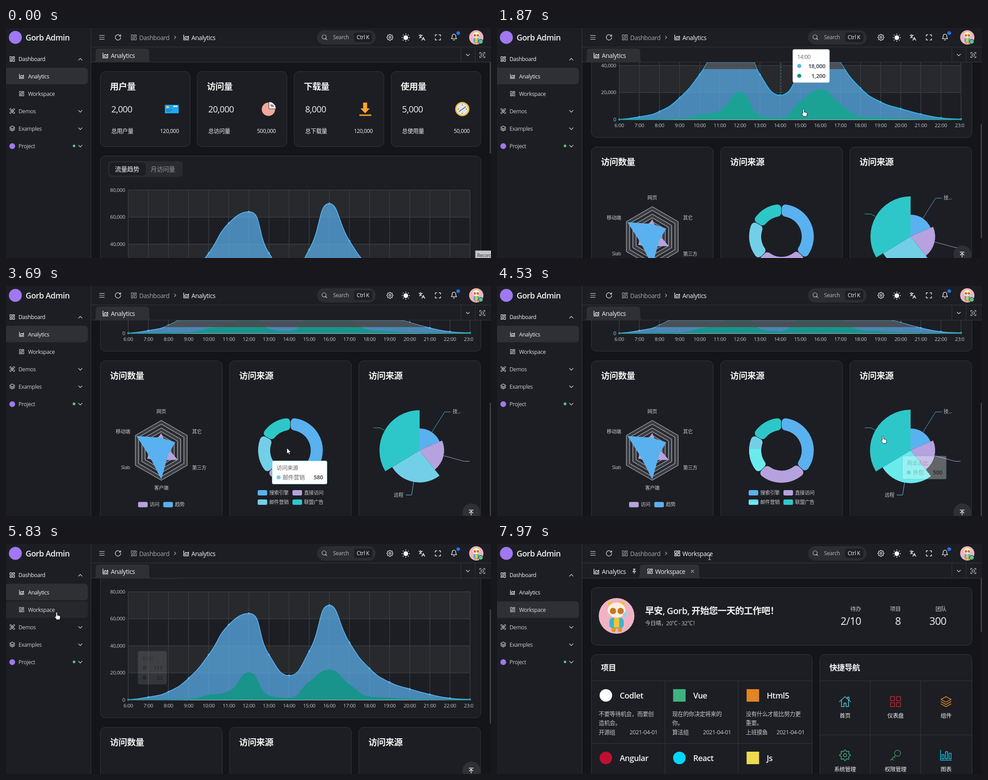
An HTML page that plays this animation: 1087 by 515 pixels, repeating every 8 s.

```html
<!DOCTYPE html>
<html lang="zh-CN">
<head>
<meta charset="utf-8">
<title>Admin dashboard</title>
<style>
html, body { margin: 0; height: 100%; overflow: hidden; background: #141519; }
svg { display: block; width: 1087px; height: 515px; }
text { font-family: "Open Sans", "Noto Sans CJK SC", "Noto Sans CJK", sans-serif; letter-spacing: -.03em; white-space: pre; }
</style>
</head>
<body>
<svg id="stage" viewBox="0 0 1087 515"></svg>
<script>
const BG = '#1c1e23', LINE = '#36373b', SOFT = '#2e3033', WHITE = '#f2f2f2', GREY = '#a3a5a9', PALE = '#c9cacd';
const BLUE = '#5ab1ef', LILAC = '#b6a2de', SKY = '#73cfe8', TEAL = '#2ec7c9';

// drawing helpers
const T = (x, y, s, size = 12.3, fill = WHITE, anchor = 'start', weight = 400) =>
  `<text x="${x}" y="${y}" font-size="${size}" fill="${fill}" text-anchor="${anchor}" font-weight="${weight}">${s}</text>`;
const R = (x, y, w, h, r, fill, stroke = 'none') =>
  `<rect x="${x}" y="${y}" width="${w}" height="${h}" rx="${r}" fill="${fill}" stroke="${stroke}"/>`;
const C = (x, y, r, fill, extra = '') => `<circle cx="${x}" cy="${y}" r="${r}" fill="${fill}" ${extra}/>`;
const P = (d, fill = 'none', stroke = 'none', w = 1, extra = '') =>
  `<path d="${d}" fill="${fill}" stroke="${stroke}" stroke-width="${w}" ${extra}/>`;
const G = (id, s) => `<g id="${id}">${s}</g>`;
const card = (x, y, w, h) => R(x + .5, y + .5, w, h, 11, BG, LINE);
const polar = (cx, cy, r, a) => `${(cx + r * Math.sin(a)).toFixed(2)} ${(cy - r * Math.cos(a)).toFixed(2)}`;
const range = n => [...Array(n).keys()];

const gear = 'M' + range(32).map(i => polar(12, 12, i % 4 < 2 ? 10.5 : 8, (i - .5) * Math.PI / 16)).join('L') +
  'ZM15.2 12a3.2 3.2 0 1 1-6.4 0a3.2 3.2 0 0 1 6.4 0';
const corners = 'M3 8V3h5M16 3h5v5M21 16v5h-5M8 21H3v-5';
const icons = {
  gear,
  dash: 'M3 3h7v9H3zM14 3h7v5h-7zM14 12h7v9h-7zM3 16h7v5H3z',
  area: 'M3 3v18h18M7 17v-5l4-4 4 4 5-5v10z',
  menu: 'M2 4h20M2 12h20M2 20h20',
  reload: 'M21 12a9 9 0 1 1-3-6.7L21 8M21 3v5h-5',
  search: 'M19 11a8 8 0 1 1-16 0a8 8 0 0 1 16 0M22 22l-5.3-5.3',
  down: 'M4 8l8 8 8-8', up: 'M4 16l8-8 8 8', right: 'M8 4l8 8-8 8',
  layers: 'M12 2L2 7.5l10 5.5 10-5.5zM2 12l10 5.5L22 12M2 16.5L12 22l10-5.5',
  full: corners,
  focus: corners + 'M8 8h8v8H8z',
  cube: corners + 'M12 6l5 3v6l-5 3-5-3V9zM7 9l5 3 5-3M12 12v6',
  lang: 'M5 8l6 6M4 14l6-6 2-3M2 5h12M7 2v3M22 22l-5-10-5 10M14 18h6',
  bell: 'M6 8a6 6 0 0 1 12 0c0 7 3 9 3 9H3s3-2 3-9M10.3 21a1.9 1.9 0 0 0 3.4 0',
  pin: 'M8 3h8M10 3v7l-4 4h12l-4-4V3M12 14v8',
  close: 'M5 5l14 14M19 5L5 19',
  top: 'M4 3h16M12 22V8M5 14l7-7 7 7',
  home: 'M1 12L12 2l11 10M5 9v13h5v-7h4v7h5V9M17 6V3h3v5',
  grid: 'M2 2h8v8H2zM14 2h8v8h-8zM2 14h8v8H2zM14 14h8v8h-8z',
  key: 'M22 8a6 6 0 1 1-12 0a6 6 0 0 1 12 0M11.7 12.3L2 22M5 19l3 3M9 15l2 2',
  bars: 'M1 2v20h22M4 19V11h4v8zM11 19V5h4v14zM18 19V8h4v11z'
};
const I = (name, cx, cy, size, color = WHITE, w = 1.2) =>
  P(icons[name], 'none', color, w * 24 / size,
    `stroke-linejoin="round" stroke-linecap="round" transform="translate(${cx - size / 2} ${cy - size / 2}) scale(${size / 24})"`);

const avatar = (x, y, r) => `<g transform="translate(${x} ${y}) scale(${r / 40})">` +
  C(0, 0, 40, '#f0b3c6') + C(-13, -26, 6, '#f2c230') + C(13, -26, 6, '#f2c230') +
  `<ellipse cy="-13" rx="20" ry="17" fill="#f6efe2"/>` + C(-8, -11, 7, '#c9761e') + C(9, -11, 7, '#c9761e') +
  R(-16, 4, 32, 24, 8, '#3cb4cf') + R(-6, 4, 12, 22, 3, '#f4c534') + C(19, -3, 5, '#8fd6ea') +
  R(-11, 26, 9, 10, 3, '#d99a2b') + R(3, 26, 9, 10, 3, '#d99a2b') + '</g>';

// analytics: number cards
const badge = [
  R(356, 172, 31, 19, 1, '#1ea7ee') + R(359, 175, 6, 4, 1, '#f6d75c') + R(375, 174, 9, 3, 0, '#d8f0ff') + P('M359 183h14M359 186h10', 'none', '#0c5f96', 1.2),
  C(371, 182, 15, '#f0a899') + P('M372 181V165a16 16 0 0 1 16 16z', '#f4f4f4', '#222', 1) + T(379, 177, '%', 9, '#222', 'middle', 600),
  P('M366 167h9v13h6l-10.5 11-10.5-11h6z', '#fba62f') + R(357.5, 193.5, 27, 3.5, 1, '#e98f1c'),
  C(371, 181.5, 14.5, '#dfe6ea', 'stroke="#f3b92e" stroke-width="3"') + P('M364 187l7-5 8-6M371 171v2M371 190v2M361 181.5h2M379 181.5h2', 'none', '#333', 1.3)
];
const stats = [['用户量', '2,000', '120,000'], ['访问量', '20,000', '500,000'], ['下载量', '8,000', '120,000'], ['使用量', '5,000', '50,000']]
  .map(([name, n, sum], i) => `<g transform="translate(${i * 217.2} 0)">` + card(211, 97, 201, 168) +
    T(233, 138, name, 19.7, WHITE, 'start', 600) + T(236, 189, n, 19.7) + badge[i] +
    T(236, 235, '总' + name, 12.7) + T(387.5, 235, sum, 12.2, WHITE, 'end') + '</g>').join('');

// analytics: area chart
const X0 = 274, X1 = 1040, Y0 = 605, STEP = (X1 - X0) / 17, UNIT = 60.5;
const visits = [111, 2000, 6000, 16000, 33333, 55555, 64000, 33333, 18000, 36000, 70000, 42444, 23222, 13000, 8000, 4000, 1200, 333];
const trend = [33, 66, 88, 333, 3333, 6200, 20000, 3000, 1200, 13000, 22000, 11000, 2221, 1201, 390, 198, 60, 30];
const points = data => data.map((v, i) => [X0 + i * STEP, Y0 - v / 20000 * UNIT]);
const clamp = (v, a, b) => Math.max(Math.min(a, b), Math.min(v, Math.max(a, b)));

// smooth line whose control points never leave the span of their neighbours
function curve(p) {
  let d = 'M' + p[0], out = p[0];
  for (let i = 1; i < p.length; i++) {
    const a = p[i - 1], b = p[i], c = p[i + 1];
    let inn = b, next = b;
    if (c) {
      const l1 = Math.hypot(b[0] - a[0], b[1] - a[1]), l2 = Math.hypot(c[0] - b[0], c[1] - b[1]);
      const k = l2 / (l1 + l2);
      next = b.map((v, j) => clamp(v + (c[j] - a[j]) * .5 * k, c[j], v));
      inn = b.map((v, j) => clamp(v - (next[j] - v) * l1 / l2, a[j], v));
      next = b.map((v, j) => v + (v - inn[j]) * l2 / l1);
    }
    d += `C${out} ${inn} ${b}`;
    out = next;
  }
  return d;
}
const close = `L${X1} ${Y0}L${X0} ${Y0}Z`;
const blueLine = curve(points(visits)), greenLine = curve(points(trend));
const series = (blue, green, w) =>
  P(blueLine + close, BLUE, 'none', 0, 'opacity=".72"') + P(blueLine, 'none', blue, w) +
  points(visits).map(p => C(...p, 2.2, blue)).join('') +
  P(greenLine + close, green, 'none', 0, 'opacity=".95"') + P(greenLine, 'none', green, w) +
  points(trend).map(p => C(...p, 1.8, green)).join('');
const chart = card(211, 286, 853, 358.5) + R(229, 298, 167, 35.5, 8, '#292b2f') + R(231.5, 301, 81.5, 29.5, 6, BG) +
  T(244, 321, '流量趋势', 14.1) + T(324, 321, '月访问量', 14.1, '#929498') +
  R(X0, 363, 766, UNIT, 0, '#27292d') + R(X0, 363 + 2 * UNIT, 766, UNIT, 0, '#27292d') +
  range(5).map(i => P(`M${X0} ${363 + i * UNIT}H${X1}`, 'none', '#3a3c41', 1.5) +
    T(267, 366.5 + i * UNIT, i < 4 ? 80 - i * 20 + ',000' : '0', 11.5, '#c3c5ca', 'end')).join('') +
  range(18).map(i => P(`M${X0 + i * STEP} 363V${Y0}`, 'none', '#3a3c41', 1.5)).join('') +
  P(`M${X0} ${Y0 + .5}H${X1}`, 'none', '#b9bbc0', 1) +
  `<g clip-path="url(#plot)">` + range(18).map(i => T(X0 + i * STEP, 621.5, i + 6 + ':00', 11.5, '#c3c5ca', 'middle')).join('') +
  G('calm', series(BLUE, '#16958b', 1.8)) + G('hover', series('#37b4f2', '#1aa394', 2) +
    P(`M636.5 479V${Y0}`, 'none', '#179a8b', 1, 'stroke-dasharray="4 3"')) + '</g>' +
  `<g clip-path="url(#under)"><rect id="band" x="${X0}" width="766" height="14" fill="#4a4d51" opacity=".95"/></g>`;

// analytics: radar, ring, rose
const CY = 867, TURN = Math.PI * 2;
const hex = vals => 'M' + vals.map((v, i) => polar(348, CY, 67 * v, -i * TURN / 6)).join('L') + 'Z';
const swatch = (x, y, color, label) => R(x, y - 6, 21.5, 12, 3, color) + T(x + 26, y + 3.5, label, 11.2, PALE);
const small = (x, y, s, anchor) => T(x, y, s, 11, PALE, anchor);
const radar = range(8).map(i => P(hex(Array(6).fill(1 - i / 8)), i % 2 ? '#292b30' : '#3b3d42', '#d9dbe0', 1)).join('') +
  P(hex([.58, .32, .55, .32, .64, .22]), LILAC) + P(hex([.42, .96, .44, .97, .27, .54]), BLUE) +
  small(348, 784, '网页', 'middle') + small(417, 829, '其它') + small(417, 910, '第三方') + small(348, 955, '客户端', 'middle') +
  small(278, 909, 'Slab', 'end') + small(278, 829, '移动端', 'end') +
  swatch(296, 988.5, LILAC, '访问') + swatch(352.5, 988.5, BLUE, '趋势');

// ring sector: an inset shape with a thick round-joined outline
function ringPart(from, to, color) {
  const cx = 637.5, o = 64, n = 54, a = from * TURN, b = to * TURN;
  const inset = r => Math.asin(9 / r);
  return P(`M${polar(cx, CY, o, a + inset(o))}A${o} ${o} 0 0 1 ${polar(cx, CY, o, b - inset(o))}` +
    `L${polar(cx, CY, n, b - inset(n))}A${n} ${n} 0 0 0 ${polar(cx, CY, n, a + inset(n))}Z`, color, color, 17, 'stroke-linejoin="round"');
}
const shares = (vals, draw) => {
  const sum = vals.reduce((a, b) => a + b);
  let at = 0;
  return vals.map((v, i) => draw(at, at += v / sum, i)).join('');
};
const hues = [BLUE, LILAC, SKY, TEAL];
const sources = [1048, 735, 580, 484];
const ring = shares(sources, (a, b, i) => ringPart(a, b, hues[i])) +
  swatch(564, 962, BLUE, '搜索引擎') + swatch(642, 962, LILAC, '直接访问') +
  swatch(564, 983, SKY, '邮件营销') + swatch(642, 983, TEAL, '联盟广告') +
  G('mailHot', shares(sources, (a, b, i) => i == 2 ? ringPart(a, b, 'url(#half)') : '') + R(564, 977, 21.5, 12, 3, 'url(#half)'));

const rose = (colors, radii) => shares([274, 310, 400, 500], (a, b, i) =>
  P(`M927 ${CY}L${polar(927, CY, radii[i], a * TURN)}A${radii[i]} ${radii[i]} 0 0 1 ${polar(927, CY, radii[i], b * TURN)}Z`, colors[i]));
const pie = P('M954 827L983 781H997', 'none', BLUE) + P('M981 879L1027 891.5H1039', 'none', LILAC) +
  P('M914 936L909 967H896', 'none', SKY) + P('M848 822L838 816.5H824', 'none', TEAL) +
  small(1001, 784, '技...') + small(869, 970.5, '远程') +
  G('roseCalm', rose(hues, [49, 55, 72, 90])) + G('roseHot', rose([BLUE, LILAC, '#6beaec', TEAL], [49, 55, 73.5, 91]));
const panels = ['访问数量', '访问来源', '访问来源'].map((s, i) =>
  card(211 + i * 289.6, 666, 273, 400) + T(233 + i * 289.6, 707, s, 19.7, WHITE, 'start', 600)).join('');

// workspace
const projects = [
  ['Codlet', '#fff', 0, '不要等待机会，而要创', '造机会。', '开源组'],
  ['Vue', '#3fb27f', 1, '现在的你决定将来的', '你。', '算法组'],
  ['Html5', '#e18525', 1, '没有什么才能比努力更', '重要。', '上班摸鱼'],
  ['Angular', '#bf1030', 0], ['React', '#00d8ff', 0], ['Js', '#ebd94e', 1]
].map(([name, color, square, a = '', b = '', team = ''], i) => {
  const x = 228 + i % 3 * 164.7, y = i < 3 ? 339 : 479;
  return (square ? R(x + 2, y - 14, 28, 28, 0, color) : C(x + 16, y, 14, color)) +
    T(x + 47, y + 7, name, 18, WHITE, 'start', 600) + T(x, y + 46, a, 12.7, PALE) + T(x, y + 66, b, 12.7, PALE) +
    T(x, y + 87, team, 12.7, PALE) + (team && T(x + 132, y + 87, '2021-04-01', 12.8, PALE, 'end'));
}).join('');
const links = [['home', '#4cc8d0', '首页'], ['grid', '#b92a32', '仪表盘'], ['layers', '#e18525', '组件'],
  ['gear', '#3fb27f', '系统管理'], ['key', '#3c8a5c', '权限管理'], ['bars', '#12c3ea', '图表']]
  .map(([name, color, s], i) => {
    const x = 780 + i % 3 * 113.2, y = i < 3 ? 353 : 473;
    return I(name, x, y, 27, color, 1.6) + T(x, y + 36, s, 12.5, WHITE, 'middle');
  }).join('');
const workspace = card(211, 97, 853, 129) + avatar(268, 161, 40) +
  T(332, 156.5, '早安, Gorb, 开始您一天的工作吧！', 20.2, WHITE, 'start', 600) + T(332, 181.5, '今日晴，20℃ - 32℃！', 12.2, PALE) +
  [['待办', '2/10', 816], ['项目', '8', 905], ['团队', '300', 1007]].map(([s, n, x]) =>
    T(x, 150, s, 12.5, PALE, 'end') + T(x, 181, n, 23.4, WHITE, 'end')).join('') +
  card(211, 247, 495, 320) + T(233, 282.5, '项目', 17.3, WHITE, 'start', 600) +
  card(723, 247, 341, 320) + T(745, 282.5, '快捷导航', 17.6, WHITE, 'start', 600) +
  P('M211 306.5H706M376.5 306V515M540.5 306V515M211 446.5H706M723 306.5H1064M836.5 306V515M949.5 306V515M723 427.5H1064', 'none', LINE) +
  projects + links;

// frame around the pages
const tab = (a, b) => P(`M${a - 8} 77q8 0 8-8V53q0-7 7-7H${b - 7}q7 0 7 7V69q0 8 8 8Z`, SOFT);
const rows = [['layers', 'Examples', 225], ['cube', 'Demos', 186], ['dash', 'Dashboard', 69.5]];
const sidebar = R(0, 0, 190, 515, 0, BG) + P('M190.5 0V515', 'none', LINE) +
  C(21, 21, 14.5, '#a078f0') + T(44, 27.5, 'Gorb Admin', 17.9, WHITE, 'start', 600) +
  G('mark', R(-4, 89, 187.5, 37, 7, SOFT)) + G('warm', R(-4, 128.5, 187.5, 37, 7, '#26282c')) +
  rows.map(([icon, s, y], i) => I(icon, 14, y, 13.5, i == 2 ? WHITE : PALE) + T(28, y + 4.5, s, 12.3, i == 2 ? WHITE : PALE) +
    I(i == 2 ? 'up' : 'down', 166.5, y + .5, 12, PALE, 1.4)).join('') +
  I('area', 35, 108, 13) + T(49.5, 112.5, 'Analytics') + I('dash', 35, 147, 13, PALE) + T(49.5, 152, 'Workspace', 12.3, '#dcdde0') +
  C(14, 264.5, 6.5, '#a078f0') + T(28, 269, 'Project', 12.3, PALE) + I('down', 166.5, 264.5, 12, PALE, 1.4) +
  `<circle id="ping" cx="152.5" cy="264" fill="#57d188"/>` + C(152.5, 264, 2.7, '#57d188');
const crumb = (icon, s) => I(icon, 404, 21, 15, WHITE, 1.4) + T(415.5, 26.5, s, 14);
const sun = C(896, 21.5, 5.2, '#fff') + range(8).map(i => C(896 + 8 * Math.cos(i * TURN / 8), 21.5 + 8 * Math.sin(i * TURN / 8), 1, '#fff')).join('');
const header = R(191, 0, 896, 77, 0, BG) + P('M191 42.5H1087M191 76.5H1087M1019.5 43V76M1051.5 43V76', 'none', LINE) +
  I('menu', 215, 21, 13, PALE) + I('reload', 251, 21, 16, PALE, 1.5) + I('dash', 286.5, 21, 15, GREY) + T(298.5, 26.5, 'Dashboard', 13.9, GREY) +
  I('right', 379, 21, 9, GREY, 1.4) +
  R(697, 5, 131.5, 32, 16, '#2b2d31') + I('search', 713.5, 20.5, 14, PALE) + T(733, 25, 'Search', 12, '#b4b6ba') + R(780, 10, 41, 21.5, 5, BG) + T(786, 25, 'Ctrl K', 12) +
  I('gear', 860.5, 21, 16) + sun + I('lang', 932, 21, 16, WHITE, 1.4) + I('full', 968, 21, 15.5, WHITE, 1.4) +
  I('bell', 1004, 20.5, 16, WHITE, 1.4) + C(1013.5, 11.5, 4, '#1677ff') + avatar(1054, 21, 16) + C(1064, 30.5, 5, '#57c98a', `stroke="${BG}"`) +
  I('down', 1035, 60.5, 11, PALE, 1.4) + I('focus', 1067.5, 60.5, 15, PALE, 1.2) +
  G('headA', tab(201, 321) + crumb('area', 'Analytics')) +
  G('headB', tab(320, 453) + crumb('dash', 'Workspace') + I('pin', 307.5, 61, 13) + I('dash', 343, 61, 14) + T(354.5, 66.5, 'Workspace', 13.9) + I('close', 438, 61, 9, PALE)) +
  I('area', 223, 61.5, 15, WHITE, 1.4) + T(235, 66.5, 'Analytics', 14);

const tip = (id, x, y, w, h, title, list, edge) => G(id, R(x, y, w, h, 3, '#fff', edge) + T(x + 10, y + 20.5, title, 12.4, '#666') +
  list.map(([color, name, n], i) => C(x + 14.5, y + 37 + i * 22, 4.6, color) + T(x + 23.5, y + 41 + i * 22, name, 12.7, '#666') +
    T(x + w - 9, y + 41.5 + i * 22, n, 13, '#5f6368', 'end', 700)).join(''));

stage.innerHTML = `<defs>
  <clipPath id="view"><rect x="191" y="77" width="896" height="438"/></clipPath>
  <clipPath id="plot"><rect x="255" y="350" width="792" height="290"/></clipPath>
  <clipPath id="under"><path d="${blueLine + close}"/></clipPath>
  <linearGradient id="half" x2="0" y2="1"><stop offset=".33" stop-color="${SKY}"/><stop offset=".33" stop-color="#6beaec"/></linearGradient>
  </defs>` + R(0, 0, 1087, 515, 0, '#141519') +
  `<g clip-path="url(#view)">` + G('pageA', stats + chart + panels + radar + ring + pie) + G('pageB', workspace) +
  '<rect id="thumb" x="1084" width="3" rx="1.5" fill="#3c3e42"/>' +
  G('toTop', C(1043, 507, 20, SOFT) + I('top', 1042.5, 507, 14, WHITE, 1.4)) + '</g>' + sidebar + header +
  G('tips', tip('tipDay', 663, 448, 82, 74, '14:00', [[BLUE, '', '18,000'], ['#019680', '', '1,200']], '#d5d8dc') +
    tip('tipDawn', 296, 496, 64, 74, '6:00', [[BLUE, '', '111'], ['#019680', '', '33']], '#d5d8dc') +
    tip('tipMail', 596.5, 890.5, 123, 52, '访问来源', [[SKY, '邮件营销', '580']], SKY) +
    tip('tipPie', 908.5, 879.5, 98.5, 52, '商业占比', [[TEAL, '外包', '500']], TEAL)) +
  G('record', R(1052, 498.5, 40, 20, 0, '#c4c6c9', '#8a8c90') + T(1056, 513, 'Record', 10.5, '#333')) +
  G('arrow', P('M0 0V12.5L3 9.8L5 14.2L7 13.3L5.1 9H9Z', '#fff', '#111', .7)) +
  G('hand', P('M-1.5 1.5q1.5-2.5 3 0V7l5 1.3q2 .7 1.5 3L7 17H0L-4 11q-.5-2 2.5-1Z', '#fff', '#111', .9)) +
  G('beam', P('M-3-5.5H-.8Q0-5.5 0-4.5V4.5Q0 5.5-.8 5.5H-3M3-5.5H.8Q0-5.5 0-4.5M0 4.5Q0 5.5 .8 5.5H3', 'none', '#e8e8e8'));

// motion: [time, values...], linear between
const scrollKeys = [[880, 0], [1260, 138], [1440, 200], [1620, 300], [1680, 300], [1840, 400], [2500, 400], [2680, 499], [5420, 499], [5720, 256]];
const mouseKeys = [[60, 1075, 505], [700, 668, 118], [1260, 667.5, 133], [1450, 660, 133], [1600, 643, 128], [1700, 643, 128], [1870, 687, 181],
  [2450, 690, 230], [2700, 620, 290], [3300, 560, 260], [3480, 576, 371], [3690, 629.5, 363], [4170, 640, 360], [4450, 860, 330],
  [4900, 888, 360], [5000, 880, 350], [5280, 290, 221], [5700, 276, 220], [5800, 113.5, 152.5], [7450, 113.5, 152.5], [7970, 476.5, 29.5]];
const fades = {
  tipDay: [[1600, 0], [1680, 1], [2000, 1], [2200, 0]],
  tipMail: [[3420, 0], [3500, 1], [3740, 1], [3950, 0]],
  tipPie: [[4500, 0], [4600, 1], [5300, 1], [5450, 0]],
  tipDawn: [[5640, 0], [5680, .9], [5740, .9], [5843, 0]],
  pageA: [[6150, 1], [6400, 0]],
  pageB: [[6450, 0], [6750, 1]]
};
const hands = [[1600, 2100], [3420, 3560], [4430, 4960], [5780, 7480]];

function at(t, keys) {
  const i = keys.findIndex(k => k[0] > t);
  if (i < 1) return (i ? keys.at(-1) : keys[0]).slice(1);
  const a = keys[i - 1], b = keys[i], f = (t - a[0]) / (b[0] - a[0]);
  return a.slice(1).map((v, j) => v + (b[j + 1] - v) * f);
}
const set = (id, name, v) => document.getElementById(id).setAttribute(name, v);
const show = (id, on) => set(id, 'visibility', on ? 'visible' : 'hidden');
const between = (t, a, b) => t >= a && t < b;

function draw(now) {
  const t = now % 8000, [scroll] = at(t, scrollKeys), [mx, my] = at(t, mouseKeys);
  const moved = t >= 6100, onB = t >= 6430;
  const fade = {};
  for (const id in fades) set(id, 'opacity', fade[id] = at(t, fades[id])[0]);
  set('pageA', 'transform', `translate(${30 * (1 - fade.pageA)} ${-scroll})`);
  set('pageB', 'transform', `translate(${-30 * (1 - fade.pageB)} 0)`);
  set('tips', 'transform', `translate(0 ${-scroll})`);
  set('thumb', 'y', onB ? 0 : 24 + scroll * .475);
  set('thumb', 'height', onB ? 197 : 257);
  set('band', 'y', scroll + 78);
  show('band', scroll > 380);
  show('toTop', scroll > 200 && !onB);

  const hot = between(t, 1620, 2150), rosy = between(t, 4430, 5400);
  show('calm', !hot);
  show('hover', hot);
  show('roseCalm', !rosy);
  show('roseHot', rosy);
  show('mailHot', between(t, 3900, 5420));

  show('headA', !moved);
  show('headB', moved);
  set('mark', 'transform', `translate(0 ${moved ? 39.5 : 0})`);
  show('warm', !moved && t >= 5790);

  const beat = t / 1000 % 1;
  set('ping', 'r', 2.7 + 2 * beat);
  set('ping', 'opacity', .7 * (1 - beat));

  show('record', t < 60);
  const hand = hands.some(([a, b]) => between(t, a, b)), beam = t > 7900;
  show('hand', hand);
  show('beam', beam);
  show('arrow', t >= 60 && !hand && !beam);
  for (const id of ['arrow', 'hand', 'beam']) set(id, 'transform', `translate(${mx} ${my})`);
}
const start = performance.now();
(function loop() {
  draw(performance.now() - start);
  requestAnimationFrame(loop);
})();
</script>
</body>
</html>
```
